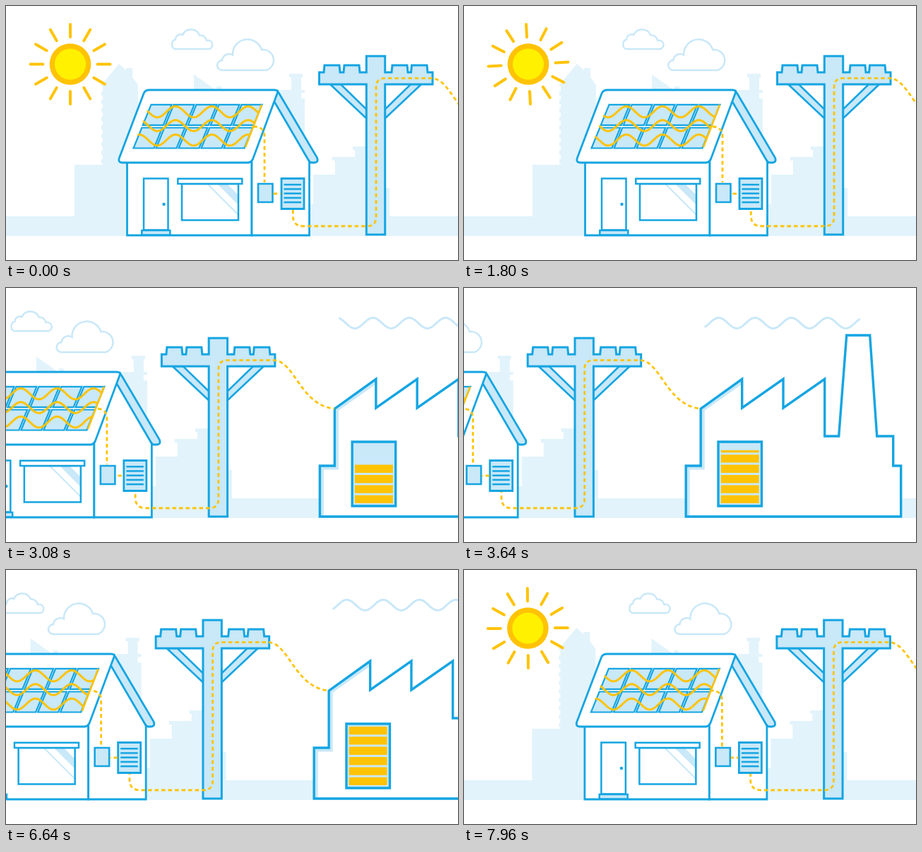
An HTML page with a canvas for the animation above (8000 ms loop, 640 px wide and 360 px high).

```html
<!DOCTYPE html>
<html>
<head>
<meta charset="utf-8">
<style>
html, body { margin: 0; width: 100%; height: 100%; overflow: hidden; background: #fff }
canvas { display: block }
</style>
</head>
<body>
<canvas id="stage" width="640" height="360"></canvas>
<script>
const ctx = document.getElementById('stage').getContext('2d');
const BLUE = '#14a5e2', PALE = '#c9e8f8', MIST = '#e2f3fb', GOLD = '#ffc305', WHITE = '#fff';
const LOOP = 8000, TRAVEL = 388, WAVE = 51.4;

function shape(d, fill, stroke, width = 3) {
  const path = new Path2D(d);
  if (fill) { ctx.fillStyle = fill; ctx.fill(path); }
  if (stroke) { ctx.strokeStyle = stroke; ctx.lineWidth = width; ctx.stroke(path); }
}
const box = (x, y, w, h, fill, stroke, width) =>
  shape(`M${x},${y}h${w}v${h}h${-w}z`, fill, stroke, width);
const clamp = v => Math.max(0, Math.min(1, v));

// Pan to the factory, rest, then pan back.
function scroll(t) {
  const a = clamp((t - 1920) / 2110), b = clamp((t - 5960) / 2060);
  return TRAVEL * (a * a * (3 - 2 * a) - (b + b * b - b * b * b));
}

function wave(x0, x1, y, amp, crest, color, width) {
  ctx.beginPath();
  for (let x = x0; x <= x1; x++) ctx.lineTo(x, y - amp * Math.cos((x - crest) / WAVE * 2 * Math.PI));
  ctx.strokeStyle = color;
  ctx.lineWidth = width;
  ctx.stroke();
}

function clipped(d, draw) {
  ctx.save();
  ctx.clip(new Path2D(d));
  draw();
  ctx.restore();
}

function skyline() {
  box(-20, 298, 1080, 28, MIST);
  box(97, 225, 80, 75, MIST);
  shape('M137,225V113H134L160,82 170,91V88H179V101L187,112V225z', MIST);
  for (let y = 121; y < 225; y += 12) box(135, y, 3, 6, MIST);
  shape('M266,97L297,119H266z', MIST);
  box(298, 114, 7, 6, MIST);
  shape('M401,96H420V101H418V119H423V123H418V131H423V300H388V123H388V119H404V101H401z', MIST);
  shape('M429,298V281H435V239H466V219H462V214H494V204H491V199H512V258H543V298z', MIST);
}

function sun(t) {
  ctx.save();
  ctx.translate(91, 82.5);
  shape('M29.3,0a29.3,29.3 0 1 1 0,-.01z', GOLD);
  shape('M22,0a22,22 0 1 1 0,-.01z', '#fff100');
  ctx.rotate(t * 0.015 * Math.PI / 180);
  ctx.lineCap = 'round';
  for (let i = 0; i < 12; i++) {
    shape('M0,-38.5V-56.5', null, GOLD, 4);
    ctx.rotate(Math.PI / 6);
  }
  ctx.restore();
}

function clouds(t) {
  ctx.save();
  ctx.translate(-10 * Math.sin(t * Math.PI / 4000) ** 2, 0);
  shape('M239,61A6,7 0 0 1 240,47.5A7,7 0 0 1 250,41A13,13 0 0 1 274,41.5A9,9 0 0 1 284,49A6,6 0 0 1 288,61z', WHITE, PALE, 2.3);
  shape('M306,91A7,7 0 0 1 306,77A10,10 0 0 1 321,69.5A21,21 0 0 1 362,62A15,15 0 0 1 369,91z', WHITE, PALE, 2.5);
  ctx.restore();
}

function panels(t) {
  for (let row = 0; row < 2; row++)
    for (let col = 0; col < 5; col++) {
      const x = 205.5 + col * 32 - row * 13.2, y = 139.8 + row * 32.7;
      shape(`M${x},${y}h29l-11.8,29h-29z`, PALE, BLUE, 2.2);
    }
  clipped('M204,138H364L338,203H178z', () => {
    const crest = 240 + WAVE * t / 1000;
    [150, 169.5, 190].forEach(y => wave(175, 366, y, 7.8, crest, GOLD, 3));
  });
  shape('M362,140L339,200', null, GOLD, 2.6);
}

function house(t) {
  box(171.5, 215, 176.5, 110, WHITE, BLUE, 2.8);
  shape('M348,325V215L381,130 429.5,220V325z', WHITE, BLUE, 2.8);
  shape('M385,121L440.5,215Q443,222 436,222H433Q430,222 428,218L379,134z', PALE, BLUE, 2.8);
  shape('M203,119H380Q386,119 384,124L349.5,217Q347,222 342,222H165Q158,222 160.5,215L195,124Q197,119 203,119z', WHITE, BLUE, 2.8);
  panels(t);

  box(195, 244.5, 34.5, 73, WHITE, BLUE, 2.5);
  shape('M225.7,281a2.2,2.2 0 1 1 0,-.01z', BLUE);
  box(192.3, 318, 40, 6.5, PALE, BLUE, 2.5);

  box(249, 252, 80, 51.5, WHITE);
  clipped('M249,252h80v51h-80z', () => {
    shape('M285,252L331,298', null, PALE, 2);
    shape('M299,252H313L330,269V283z', PALE);
  });
  box(249, 252, 80, 51.5, null, BLUE, 2.5);
  box(243.3, 244.7, 91, 7.3, WHITE, BLUE, 2.5);

  box(357, 252, 20.5, 26, PALE, BLUE, 2.6);
  box(390, 244.5, 32, 43, PALE, BLUE, 2.8);
  for (let i = 0; i < 5; i++) shape(`M393.5,${253.2 + i * 6.25}h24.5`, null, BLUE, 2.5);
}

function pole() {
  shape('M459,111L511,160V147L474,111z', PALE, BLUE, 2.6);
  shape('M588,111L536,160V147L573,111z', PALE, BLUE, 2.6);
  shape('M510.3,324V111H443.5V94H450L451,84H472L473,94H478L479,84H500L501,94H510.3V71H536.7V94H546L547,84H568L569,94H573.5L574.5,84H596L597,94H604V111H536.7V324z', PALE, BLUE, 3);
}

function factory(t) {
  const outline = 'M667.5,324V252H688.5V171L747,129V170L805.3,129V170L864,129V210H884L895,67H928L938,210H961V252H972V324z';
  shape(outline, WHITE);
  clipped(outline, () => shape('M670,324V254.5H691V172L749,131', null, PALE, 6));
  shape(outline, null, BLUE, 3.4);

  const top = Math.max(222, 267 - (t - 2560) * 0.0343);
  box(713.3, 218, 61.5, 91, PALE, BLUE, 3.4);
  clipped(`M716,${top}h56V305h-56z`, () => {
    for (let i = 0; i < 6; i++) box(717, 221.8 + i * 14.4, 54, 11.4, GOLD);
  });

  const beat = t % 1000;
  if (beat >= 100 && beat < 600)
    for (let x = 708; x < 830; x += 60) shape(`M${x + 13},164L${x},183h8l-2,12.5L${x + 20},177h-9z`, GOLD);

  wave(694, 914, 49.7, 7.5, 695.5 - WAVE * t / 1000, PALE, 3);
}

function cable(t) {
  ctx.setLineDash([5.5, 4]);
  ctx.lineDashOffset = -t / 1000 * 38;
  shape('M350,171H353Q366,172 366,185V250', null, GOLD, 2.8);
  shape('M378.5,266H389', null, GOLD, 2.8);
  shape('M406.3,289V297Q406.3,312 421,312H511Q524,312 524,299V115Q524,102.3 537,102.3H603C632,104 640,166 688,171', null, GOLD, 2.8);
  ctx.setLineDash([]);
}

function frame(now) {
  const t = now % LOOP;
  ctx.fillStyle = WHITE;
  ctx.fillRect(0, 0, 640, 360);
  ctx.save();
  ctx.lineJoin = 'miter';
  ctx.translate(-scroll(t), 0);
  skyline();
  sun(t);
  clouds(t);
  house(t);
  pole();
  factory(t);
  cable(t);
  ctx.restore();
  requestAnimationFrame(frame);
}
requestAnimationFrame(frame);
</script>
</body>
</html>
```
